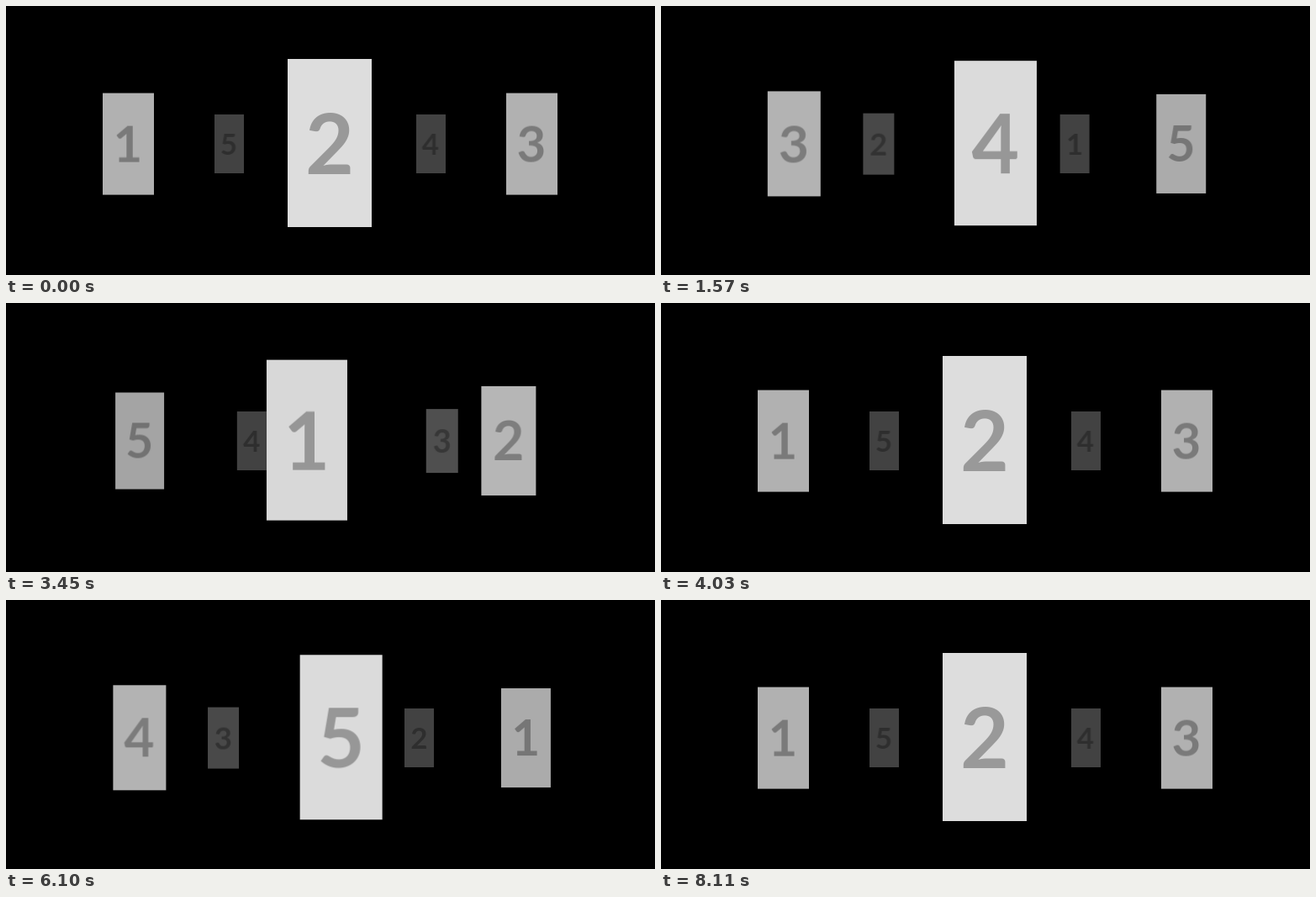
Animation of 772x320 px, one loop 9600 ms. Source, as an HTML page:

```html
<!DOCTYPE html>
<html lang="en">
<head>
<meta charset="utf-8">
<title>Card carousel</title>
<style>
  html, body {
    margin: 0;
    width: 100%;
    height: 100%;
    overflow: hidden;
    background: #000;
  }
  .stage {
    position: relative;
    width: 772px;
    height: 320px;
    overflow: hidden;
  }
  .card {
    position: absolute;
    left: 335px;
    top: 63px;
    width: 100px;
    height: 200px;
    background: #ddd;
    color: #999;
    font: bold 100px/196px Lato, sans-serif;
    text-align: center;
  }
</style>
</head>
<body>
<div class="stage">
  <div class="card">1</div>
  <div class="card">2</div>
  <div class="card">3</div>
  <div class="card">4</div>
  <div class="card">5</div>
</div>
<script>
  const LOOP = 9600;
  const FRONT = 1; // index of the card in front at rest

  // Places around the ring, starting at the front
  const slots = [
    { x: 0, y: 0, scale: 1, light: 1 },
    { x: 240, y: 0.6, scale: 0.6, light: 0.8 },
    { x: 120, y: 1, scale: 0.35, light: 0.3 },
    { x: -120, y: 1, scale: 0.35, light: 0.3 },
    { x: -240, y: 0.6, scale: 0.6, light: 0.8 }
  ];

  // [time in ms, turns made]: five turns forward, a rest, five turns back
  const beats = [
    [0, 0], [220, 0], [960, 1], [1690, 2], [2480, 3], [3273, 4], [4030, 5],
    [4450, 5], [5230, 4], [5983, 3], [6690, 2], [7356, 1], [8110, 0], [LOOP, 0]
  ];

  function pose(index, [time, turns]) {
    const count = slots.length;
    const { x, y, scale, light } = slots[(index - FRONT - turns + 2 * count) % count];
    return {
      offset: time / LOOP,
      easing: "ease-in-out",
      transform: `translate(${x}px, ${y}px) scale(${scale})`,
      filter: `brightness(${light})`,
      zIndex: Math.round(scale * 100)
    };
  }

  document.querySelectorAll(".card").forEach((card, index) => {
    card.animate(beats.map(beat => pose(index, beat)), {
      duration: LOOP,
      iterations: Infinity
    });
  });
</script>
</body>
</html>
```
